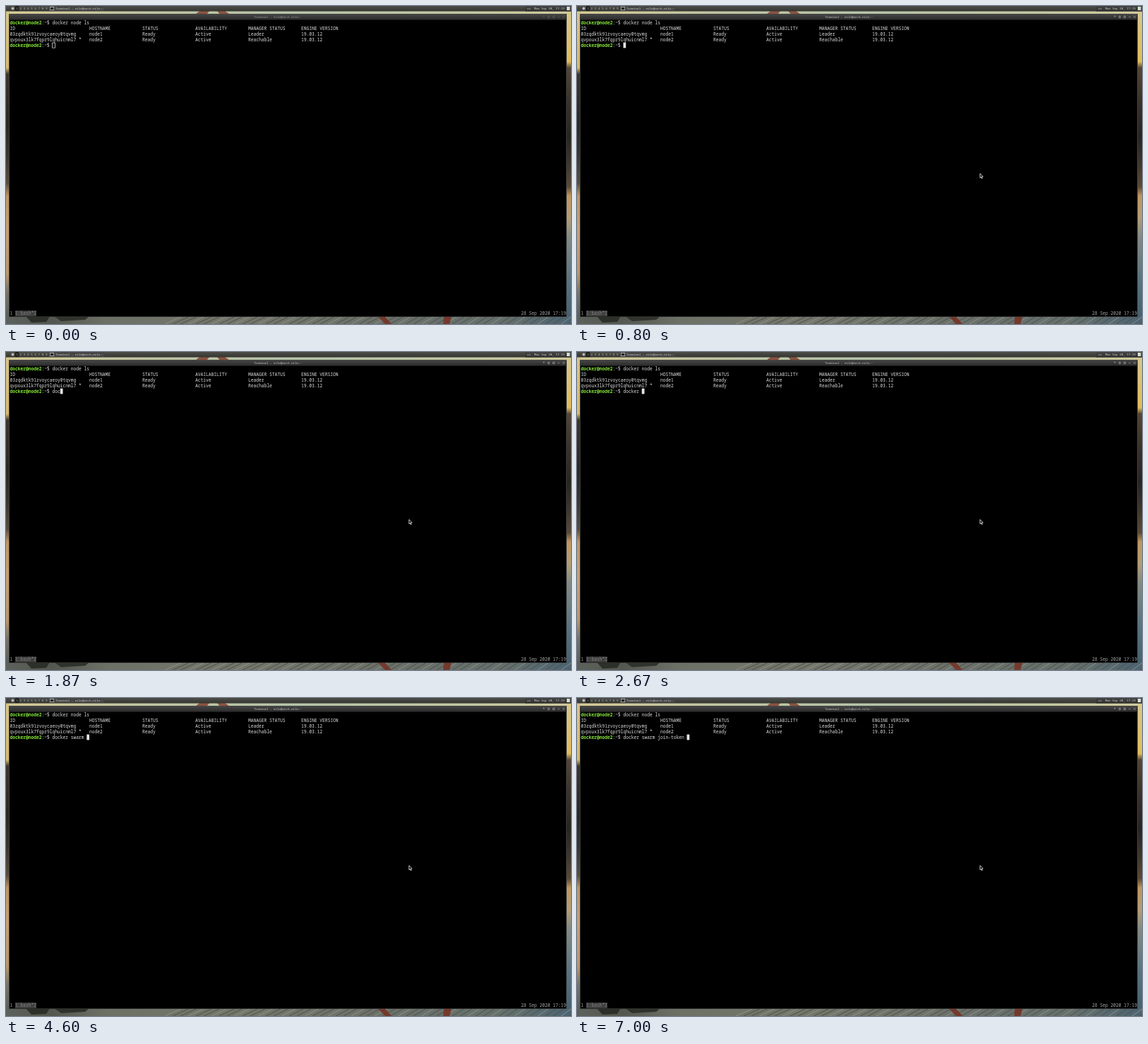
Write an HTML page with a canvas that moves like this. It is 800 px wide and 450 px high and loops after 8000 ms.

```html
<!DOCTYPE html>
<html lang="en">
<head>
<meta charset="utf-8">
<title>Terminal</title>
<style>
html, body { margin: 0; width: 100%; height: 100%; overflow: hidden; background: #000; }
canvas { display: block; width: 800px; height: 450px; }
</style>
</head>
<body>
<canvas id="stage" width="800" height="450"></canvas>
<script>
const ctx = document.getElementById("stage").getContext("2d");
const LOOP = 8000;
const CELL = 3.75, LEFT = 5.5, LINE = 8, TOP = 19.5;
const MONO = '"Noto Sans Mono", monospace';
const TITLE = "Terminal - nilo@arch-nilo:~";
const PROMPT = 16;

// [time, command typed so far]
const typing = [
  [0, ""], [1670, "d"], [1730, "do"], [1870, "doc"], [2000, "dock"],
  [2200, "docke"], [2530, "docker"], [2670, "docker "], [3130, "docker n"],
  [3930, "docker "], [4130, "docker sw"], [4270, "docker swa"],
  [4600, "docker swarm "], [5730, "docker swarm j"], [6270, "docker swarm jo"],
  [6330, "docker swarm join"], [6870, "docker swarm join-"],
  [7000, "docker swarm join-token "]
];

const table = [
  ["ID", "HOSTNAME", "STATUS", "AVAILABILITY", "MANAGER STATUS", "ENGINE VERSION"],
  ["03zqdktk91zvoycaeoy0tqvmg", "node1", "Ready", "Active", "Leader", "19.03.12"],
  ["qvpoux3lk7fqpr9lqhuicnml7 *", "node2", "Ready", "Active", "Reachable", "19.03.12"]
];
const columns = [0, 30, 50, 70, 90, 110];

function rect(x, y, w, h, color) {
  ctx.fillStyle = color;
  ctx.fillRect(x, y, w, h);
}

function poly(points, color) {
  ctx.fillStyle = color;
  ctx.beginPath();
  points.forEach(([x, y]) => ctx.lineTo(x, y));
  ctx.closePath();
  ctx.fill();
}

function gradient(x0, y0, x1, y1, stops) {
  const g = ctx.createLinearGradient(x0, y0, x1, y1);
  stops.forEach(([at, color]) => g.addColorStop(at, color));
  return g;
}

// Text is laid out large and scaled down to keep fractional advances.
function text(str, x, y, size, color, weight = 400) {
  ctx.save();
  ctx.translate(x, y);
  ctx.scale(size / 100, size / 100);
  ctx.font = `${weight} 100px ${MONO}`;
  ctx.fillStyle = color;
  ctx.fillText(str, 0, 0);
  ctx.restore();
}

function cellText(str, col, row, color = "#dcdcdc", weight) {
  text(str, LEFT + col * CELL, TOP + row * LINE + 6.3, 6.25, color, weight);
}

function drawPlanks() {
  ctx.lineWidth = 1;
  for (let x = 225, i = 0; x < 800; x += 11, i++) {
    const lean = 26 - x * 0.015;
    ctx.strokeStyle = i % 3 ? "#4d5049" : "#8d8f82";
    ctx.beginPath();
    ctx.moveTo(x + lean, 440);
    ctx.lineTo(x, 450);
    ctx.stroke();
  }
}

function drawWallpaper() {
  rect(0, 7, 800, 5, gradient(0, 0, 800, 0, [
    [0, "#d5ca94"], [0.2, "#c3c5a0"], [0.5, "#b5c4a9"], [0.8, "#c2c8a2"], [1, "#cfc99b"]
  ]));
  poly([[268, 12], [274, 7], [288, 7], [284, 12]], "#8b5340");
  poly([[299, 7], [310, 7], [317, 12], [303, 12]], "#8b5340");

  rect(0, 8, 5, 442, gradient(0, 8, 0, 450, [
    [0, "#d5c489"], [0.18, "#d6b96c"], [0.2, "#3d352b"], [0.36, "#2c2722"],
    [0.46, "#3b3630"], [0.55, "#5b4d3f"], [0.59, "#bd9464"], [0.7, "#c6a072"],
    [0.84, "#b8966c"], [0.9, "#77736a"], [1, "#525a55"]
  ]));
  rect(794, 8, 6, 442, gradient(0, 8, 0, 450, [
    [0, "#d5c78c"], [0.16, "#e1bc5d"], [0.18, "#544637"], [0.28, "#3b332b"],
    [0.4, "#282520"], [0.48, "#3b352c"], [0.56, "#5a4a37"], [0.59, "#c0965f"],
    [0.66, "#b39d77"], [0.72, "#838b83"], [0.86, "#587382"], [1, "#425d6d"]
  ]));
  rect(0, 439, 800, 11, gradient(0, 0, 800, 0, [
    [0, "#5c625b"], [0.08, "#535750"], [0.18, "#6d7165"], [0.4, "#74776b"],
    [0.64, "#6c716a"], [0.88, "#65706d"], [1, "#4b6473"]
  ]));
  drawPlanks();
  poly([[28, 439], [62, 439], [57, 447], [36, 448]], "#2d3029");
  poly([[68, 439], [118, 439], [112, 444], [78, 446]], "#30332c");
  poly([[526, 439], [536, 439], [546, 450], [537, 450]], "#74392c");
  poly([[620, 439], [631, 439], [628, 450], [619, 450]], "#74392c");
}

function drawPanel() {
  rect(0, 0, 800, 7.5, gradient(0, 0, 0, 7.5, [[0, "#4d4d48"], [1, "#353532"]]));
  rect(735, 0, 65, 7.5, gradient(0, 0, 0, 7.5, [[0, "#444"], [1, "#303030"]]));
  ctx.fillStyle = "#b8b8b8";
  ctx.beginPath();
  ctx.arc(9.5, 3.5, 2, 0, 7);
  ctx.fill();
  rect(13, 0, 5, 7, "#1d1d1d");
  for (let i = 1; i <= 9; i++) text(String(i), 9.2 + i * 5.2, 5, 4.2, "#bcbcbc");
  rect(61, 0.5, 78, 6.5, "#444");
  rect(62, 1, 6, 5, "#c4c4c4");
  rect(62.7, 1.8, 4.6, 3.5, "#242424");
  text(TITLE, 70, 5, 4.2, "#d0d0d0");
  text("us", 738, 5, 4.2, "#ccc");
  text("Mon Sep 28, 17:19", 748, 5, 4.2, "#d4d4d4");
  rect(794, 1, 4.5, 5, "#d5dfd0");
}

function drawButtons(color) {
  text("+", 760, 17.2, 5, color, 700);
  ctx.strokeStyle = color;
  ctx.lineWidth = 0.6;
  ctx.strokeRect(767.3, 14.2, 2, 2.6);
  ctx.strokeRect(774.2, 14.2, 2.6, 2.6);
  ctx.beginPath();
  ctx.moveTo(781, 15.6); ctx.lineTo(784, 15.6);
  ctx.moveTo(788, 14); ctx.lineTo(791, 17);
  ctx.moveTo(791, 14); ctx.lineTo(788, 17);
  ctx.stroke();
}

function drawWindow(focused) {
  rect(4, 11, 790, 429, "#3c3c3c");
  rect(4, 11, 790, 8.5, gradient(0, 11, 0, 19.5, [[0, "#484848"], [1, "#2b2b2b"]]));
  rect(5, 19.5, 788, 419.8, "#000");
  text(TITLE, 351, 17.2, 4.2, focused ? "#d0d0d0" : "#a2a2a2");
  drawButtons(focused ? "#aaa" : "#5c5c5c");
}

function drawPrompt(row, command) {
  cellText("docker@node2", 0, row, "#87ea3b", 700);
  cellText(":~$ " + command, 12, row);
}

function drawStatusLine() {
  const y = 437.4, color = "#a6a6a6";
  text("1", LEFT, y, 6.25, color);
  rect(13, 431, 30, 8, "#3e3e3e");
  text("1:bash*Z", 13, y, 6.25, "#858585");
  text("28 Sep 2020 17:19", 729.3, y, 6.25, color);
}

function drawTerminal(t) {
  const command = typing.filter(([at]) => at <= t).pop()[1];
  drawPrompt(0, "docker node ls");
  table.forEach((cells, r) => cells.forEach((s, c) => cellText(s, columns[c], r + 1)));
  drawPrompt(4, command);

  const x = LEFT + (PROMPT + command.length) * CELL;
  if (t < 800) {
    ctx.strokeStyle = "#d0d0d0";
    ctx.lineWidth = 0.8;
    ctx.strokeRect(x + 0.1, 52, 3.9, 7.2);
  } else {
    rect(x, 51.6, CELL, 7.8, "#e6e6e6");
  }
  drawStatusLine();
}

function drawPointer(t) {
  const step = Math.min(8, Math.floor((t + 1) * 15 / 1000));
  if (step < 1) return;
  const rest = (1 - step / 8) ** 2;
  ctx.save();
  ctx.translate(570.7 + 280 * rest, 237 + 250 * rest);
  const arrow = [[0, 0], [0, 6.2], [1.4, 5], [2.4, 7.2], [3.4, 6.8], [2.4, 4.6], [4.2, 4.4]];
  poly(arrow, "#111");
  ctx.strokeStyle = "#e4e4e4";
  ctx.lineWidth = 0.8;
  ctx.stroke();
  ctx.restore();
}

function render(now) {
  const t = now % LOOP;
  drawWallpaper();
  drawPanel();
  drawWindow(t >= 670);
  drawTerminal(t);
  drawPointer(t);
}

const start = performance.now();
function frame() {
  render(performance.now() - start);
  requestAnimationFrame(frame);
}
frame();
</script>
</body>
</html>
```
